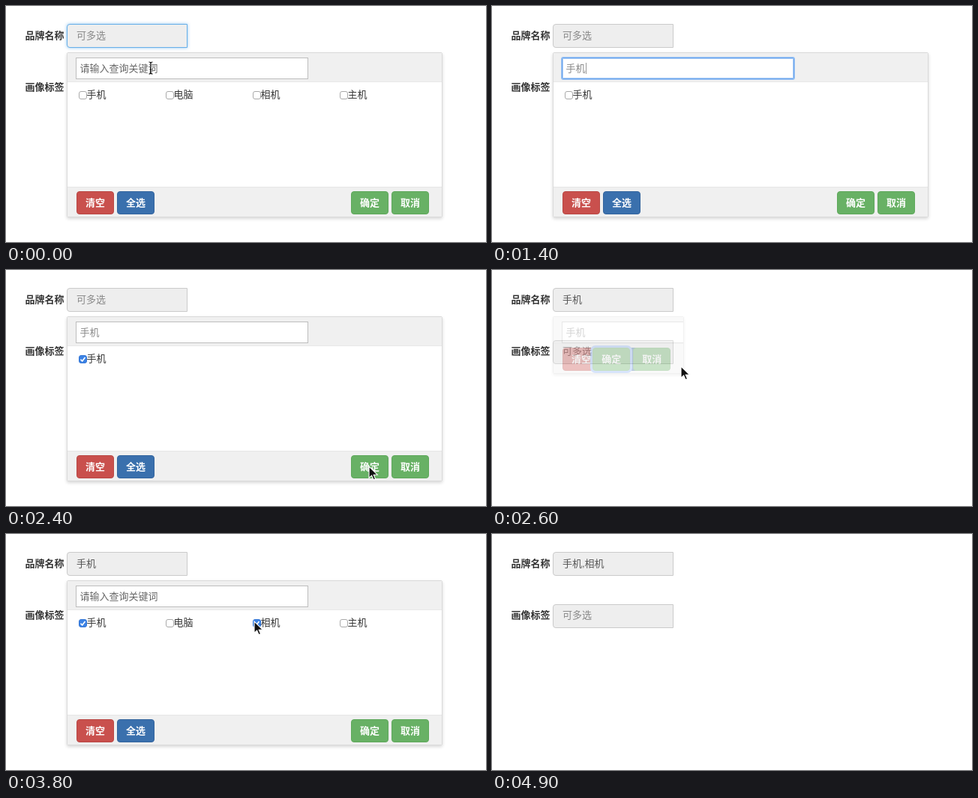
These frames come from a looping animation (640x316 px, 5 s). An HTML page:

```html
<!DOCTYPE html>
<html lang="zh-CN">
<head>
<meta charset="utf-8">
<style>
html, body { margin: 0; width: 100%; height: 100%; overflow: hidden; background: #fff; }
body { position: relative; font: 13px/20px "Liberation Sans", "Noto Sans CJK SC", "Noto Sans CJK", sans-serif; color: #333; }
body * { box-sizing: border-box; white-space: nowrap; }
.abs, .label, .field, .btn, .item { position: absolute; }
.label { left: 25.5px; font-weight: bold; }
.field { left: 81px; width: 161px; height: 32px; padding: 5px 12px; background: #eee;
  border: 1px solid #cacaca; border-radius: 4px 0 0 4px; color: #888; }
.field.set { color: #555; }
.field.glow { border-color: #66afe9; box-shadow: 0 0 4px rgba(102,175,233,.7); }
#panel { left: 81px; top: 62px; overflow: hidden; background: #fff; border: 1px solid #dadada;
  border-radius: 2px; box-shadow: 0 2px 4px rgba(0,0,0,.16); }
.head { left: 0; right: 0; top: 0; height: 39px; background: #f0f0f0; border-bottom: 1px solid #e8e8e8; }
.foot { left: 0; right: 0; bottom: 0; height: 40px; background: #f0f0f0; border-top: 1px solid #e6e6e6; }
#search { left: 11px; top: 6px; width: 310px; height: 29px; padding: 4px 4.5px; background: #fff;
  border: 1px solid #bdbdbd; color: #666; }
#search.typed { color: #888; }
#search.focus { border-color: #6ea6ec; border-radius: 2px;
  box-shadow: inset 0 0 0 1px #a9ccf6, 0 0 0 1px #9cc4f4; }
#search.compose span { text-decoration: underline; color: #777; }
.caret { display: inline-block; width: 1px; height: 15px; vertical-align: -3px; background: #999; }
.list { left: 0; right: 0; top: 39px; bottom: 40px; overflow: hidden; }
.item { top: 7px; padding-left: 11px; }
.item svg { position: absolute; left: 0; top: 5px; }
.item rect { fill: #fff; stroke: #a9a9a9; }
.item path { fill: none; stroke: none; }
.item.on rect { fill: #3c82e4; stroke: #3577d6; }
.item.on path { stroke: #fff; stroke-width: 1.6; }
.btn { bottom: 3px; width: 50px; height: 31px; line-height: 30px; text-align: center; color: #fff;
  font-weight: bold; border: 1px solid; border-radius: 4px; }
.red { left: 12px; background: #c9504d; border-color: #b94845; }
.blue { left: 66px; background: #3a70ad; border-color: #34659e; }
.green { background: #68b165; border-color: #5ea85b; }
.btn.focus { box-shadow: 0 0 0 3px #8fb4f5; }
#ime { left: 100px; top: 93px; height: 53px; padding: 0 8px 0 13px; border-radius: 4px; color: #f4f4f4;
  background: rgba(53,53,53,.9); box-shadow: 0 1px 4px rgba(0,0,0,.35); }
#pinyin { left: 11.5px; top: 3px; font-size: 15px; color: #7fc8ee; }
#pinyin .caret { height: 18px; vertical-align: -4px; background: #eee; }
#cands { display: flex; gap: 11px; padding-top: 27.5px; font-size: 14px; }
#cands span:first-child { color: #8accee; }
#cands svg { vertical-align: -3px; }
#cands b { margin: 3px 0 0 2px; color: #8a8a8a; font-size: 17px; }
#cands i { font-style: normal; color: #63c3f5; margin-left: 5px; }
</style>
</head>
<body>
<div class="label" style="top:30px">品牌名称</div>
<div class="field" id="brand" style="top:24px"></div>
<div class="label" style="top:99px">画像标签</div>
<div class="field" style="top:94px;padding-top:4px">可多选</div>
<div class="abs" id="panel">
  <div class="abs head"><div class="abs" id="search"></div></div>
  <div class="abs list" id="list"></div>
  <div class="abs foot">
    <div class="btn red">清空</div>
    <div class="btn blue">全选</div>
    <div class="btn green" id="ok" style="right:71px">确定</div>
    <div class="btn green" style="right:17px">取消</div>
  </div>
</div>
<div class="abs" id="ime"><div class="abs" id="pinyin"></div><div id="cands"></div></div>
<svg class="abs" id="pointer" style="left:0;top:0" width="640" height="316">
  <path id="arrow" d="M0 0V15.5L3.6 12.2L6 17.8L8.6 16.7L6.2 11.2H11.2Z" fill="#111" stroke="#fff" stroke-width="1.1"/>
  <path id="beam" d="M-2.5 -8Q0 -8 0 -6V6Q0 8 -2.5 8M2.5 -8Q0 -8 0 -6M0 6Q0 8 2.5 8M-1.5 2H1.5" fill="none" stroke="#111" stroke-width="1.2"/>
</svg>
<script>
const $ = id => document.getElementById(id);
const LOOP = 5000, STEP = 100;
const HINT = '请输入查询关键词';
const HAND = '<svg width="18.5" height="19" viewBox="0 0 18.5 19" fill="none" stroke="#f8c04a" stroke-width="2.5" stroke-linecap="round">' +
  '<path d="M5 11L2 6.5M6.5 9L4.6 3M9 9L8.6 1.6M11.5 9L12.4 3M12.5 14L16.8 10.5"/>' +
  '<path d="M5.5 10.5H12L12.5 14L10.5 17H7.5Z" fill="#f8c04a" stroke-linejoin="round"/></svg>';

// Each row holds from its step until the next row.
const typing = [[0, ''], [3, 's'], [4, 'sh'], [5, 'sho'], [6, 'shou'], [8, 'shouj'], [9, 'shouji'], [12, '']];
const words = [[0, HINT], [12, '手机'], [27, HINT]];
const scale = [[0, 1], [25, .82], [26, .35], [27, 0], [29, .5], [30, 1], [43, .82], [44, .35], [45, 0]];
const brands = [[0, '可多选'], [25, '手机'], [43, '手机,相机']];
const shown = [[0, '手机电脑相机主机'], [3, ''], [12, '手机'], [27, '手机电脑相机主机']];
const options = { s: '是上说时三', sh: '是上说时事', sho: ['手', HAND, '收', '受', '瘦'] };
options.shou = options.sho;
options.shouj = options.shouji = ['手机', '收集', '手迹', '手记'];
// step, x, y
const track = [[0, 193, 83], [15, 193, 83], [19, 133, 118], [20, 133, 118], [22, 310, 298], [24, 484, 263],
  [25, 472, 258], [26, 252, 129], [28, 190, 42], [32, 190, 42], [37, 331, 117], [39, 331, 117], [42, 484, 263], [50, 484, 263]];

const held = (rows, n) => rows.filter(r => r[0] <= n).pop()[1];
const within = (n, a, b) => n >= a && n < b;

function pointerAt(n) {
  const i = track.findIndex(k => k[0] > n);
  const [a, x, y] = track[i - 1], [b, x2, y2] = track[i];
  const p = (n - a) / (b - a);
  return [x + (x2 - x) * p, y + (y2 - y) * p];
}

const items = ['手机', '电脑', '相机', '主机'].map((name, i) => {
  const el = document.createElement('div');
  el.className = 'item';
  el.style.left = 14.5 + i * 116 + 'px';
  el.innerHTML = '<svg width="11" height="11"><rect x=".5" y=".5" width="10" height="10" rx="2.5"/>' +
    '<path d="M2.5 5.7L4.7 8L8.5 3"/></svg>' + name;
  $('list').append(el);
  return { el, name };
});
const checkedFrom = { 手机: 19, 相机: 37 };

function draw(n) {
  const brand = $('brand'), search = $('search'), panel = $('panel').style;
  brand.textContent = held(brands, n);
  brand.classList.toggle('set', n >= 25);
  brand.classList.toggle('glow', n === 0 || within(n, 29, 37));

  const s = held(scale, n);
  panel.display = s ? 'block' : 'none';
  panel.width = 501 * s + 'px';
  panel.height = 221 * s + 'px';
  panel.opacity = s;
  $('ok').classList.toggle('focus', within(n, 25, 27) || within(n, 43, 45));

  const pinyin = held(typing, n), focus = within(n, 1, 19), caret = '<i class="caret"></i>';
  const text = pinyin || held(words, n);
  const hint = text === HINT;
  search.innerHTML = (focus && hint ? caret : '') + `<span>${text}</span>` + (focus && !hint ? caret : '');
  search.classList.toggle('focus', focus);
  search.classList.toggle('typed', !hint);
  search.classList.toggle('compose', !!pinyin);

  const visible = held(shown, n);
  for (const { el, name } of items) {
    el.style.display = visible.includes(name) ? 'block' : 'none';
    el.classList.toggle('on', n >= checkedFrom[name]);
  }

  $('ime').style.display = pinyin ? 'block' : 'none';
  if (pinyin) {
    $('pinyin').innerHTML = pinyin + caret;
    $('cands').innerHTML = [...options[pinyin]].map((c, i) => `<span>${i + 1}.${c}</span>`).join('') + '<b>‹<i>›</i></b>';
  }

  const [x, y] = pointerAt(n), beam = n < 17;
  $('pointer').style.display = within(n, 3, 15) || n >= 46 ? 'none' : 'block';
  $('arrow').style.display = beam ? 'none' : 'block';
  $('beam').style.display = beam ? 'block' : 'none';
  $(beam ? 'beam' : 'arrow').setAttribute('transform', `translate(${x} ${y})`);
}

const start = performance.now();
let last = -1;
function tick(now) {
  const n = Math.floor(Math.max(0, now - start) % LOOP / STEP);
  if (n !== last) draw(last = n);
  requestAnimationFrame(tick);
}
tick(start);
</script>
</body>
</html>
```
